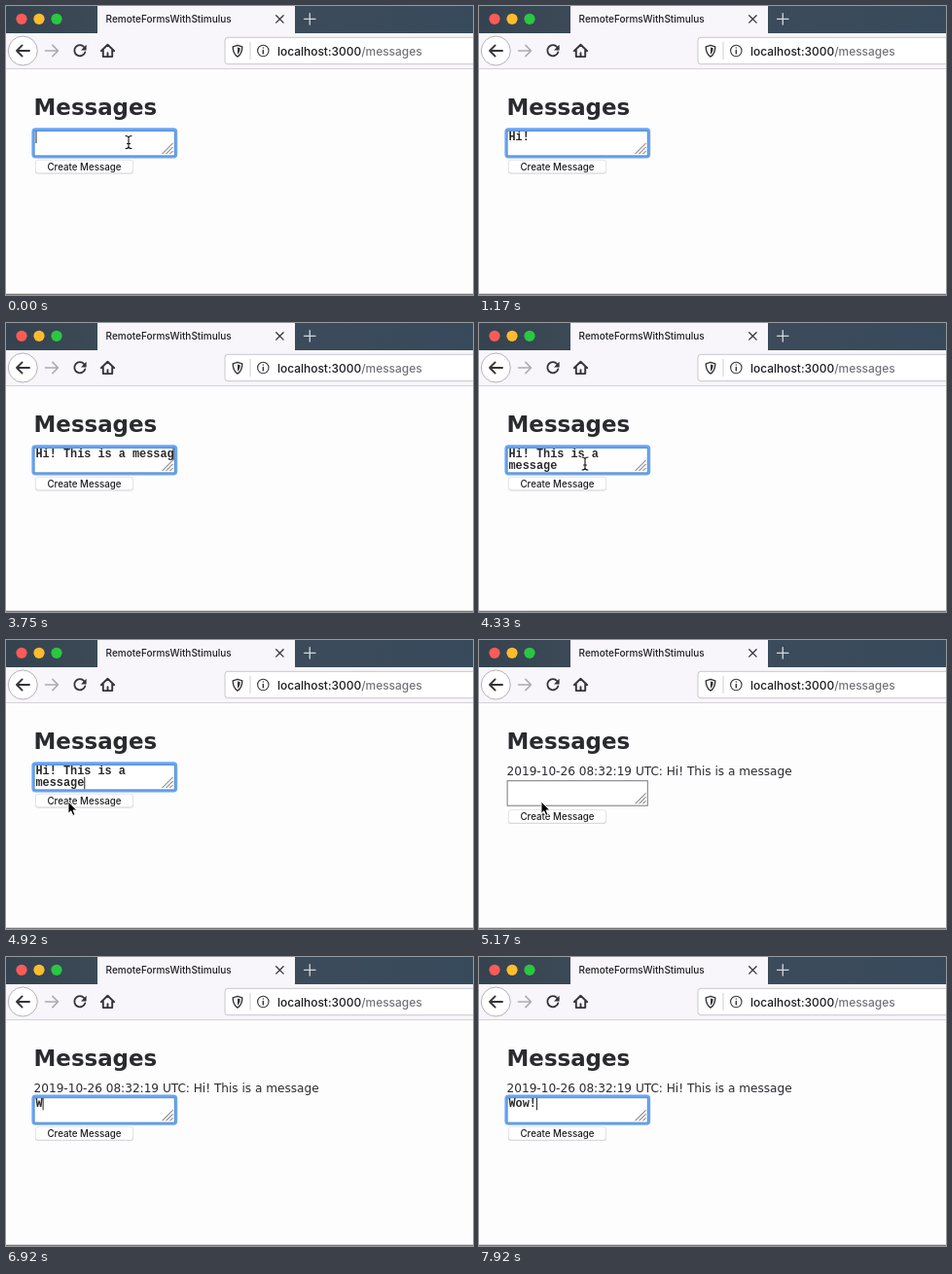
An HTML page for the animation above (8000 ms loop, 480x297 px).

```html
<!DOCTYPE html>
<html lang="en">
<head>
<meta charset="utf-8">
<title>Messages</title>
<style>
  html, body { margin: 0; width: 100%; height: 100%; overflow: hidden; background: #fff; }
  svg { display: block; width: 100vw; height: 100vh; }
  text { white-space: pre; }
  .ui { font-family: Inter, sans-serif; font-weight: 500; fill: #1c1c20; }
  .page { font-family: "DejaVu Sans", sans-serif; fill: #2a2b2f; }
  .mono { font: bold 11.85px "Liberation Mono", monospace; fill: #2a2a2a; }
  .icon { fill: none; stroke: #343438; stroke-width: 1.6; stroke-linecap: round; stroke-linejoin: round; }
</style>
</head>
<body>
<svg viewBox="0 0 480 297">
  <defs>
    <linearGradient id="bar">
      <stop offset="0" stop-color="#34434f"/>
      <stop offset=".2" stop-color="#3b4a56"/>
      <stop offset=".65" stop-color="#3c4b5b"/>
      <stop offset="1" stop-color="#374a5b"/>
    </linearGradient>
    <clipPath id="inner"><rect x="29.5" y="128.5" width="143.5" height="25"/></clipPath>
  </defs>

  <rect width="480" height="297" fill="#fefdfe"/>
  <rect width="480" height="28" fill="url(#bar)"/>
  <circle cx="16" cy="13.3" r="5.6" fill="#fc5b57"/>
  <circle cx="34" cy="13.3" r="5.6" fill="#fdbc2e"/>
  <circle cx="52" cy="13.3" r="5.6" fill="#2ac840"/>

  <rect y="28" width="480" height="36.5" fill="#f8f6fa"/>
  <rect x="94" width="203" height="29" fill="#f8f6fa"/>
  <text class="ui" x="102.6" y="17.4" font-size="10">RemoteFormsWithStimulus</text>
  <path class="icon" d="M277.7 9.7l7.4 7.4m0-7.4l-7.4 7.4" style="stroke-width:1.3"/>
  <path class="icon" d="M306.5 13.3h11.5m-5.75-5.75v11.5" style="stroke:#d3d8dc;stroke-width:1.3"/>
  <rect y="64" width="480" height="1" fill="#d3d1d5"/>

  <circle cx="17.3" cy="46" r="15" fill="#fff" stroke="#b5b3b8"/>
  <path class="icon" d="M24 46H11m5.6-5.6L11 46l5.6 5.6" style="stroke-width:1.9"/>
  <path class="icon" d="M40.5 46h13m-5.6-5.6l5.6 5.6l-5.6 5.6" style="stroke:#acabb0"/>
  <path class="icon" d="M80.3 42.2a5.6 5.6 0 1 0 1 5.2" style="stroke-width:1.8"/>
  <path d="M82.6 39.8v5.6h-5.6z" fill="#343438"/>
  <path class="icon" d="M97.8 46.2l6.7-6.4l6.7 6.4M99.8 45.5v6.6h9.4v-6.6M104.5 51.8v-3.5" style="stroke-width:1.9"/>

  <rect x="225" y="32.3" width="262" height="27.4" rx="3" fill="#fff" stroke="#c9c7cc"/>
  <path class="icon" d="M238 40.3l4.8 1.5c0 5-1.3 8.2-4.8 10.3c-3.5-2.1-4.8-5.3-4.8-10.3z" style="stroke-width:1.4"/>
  <path d="M238 42.5v7.2c1.8-1.5 2.6-3.5 2.7-6.4z" fill="#343438"/>
  <rect x="250.5" y="37" width="1" height="18" fill="#d0ced3"/>
  <circle class="icon" cx="264.3" cy="46" r="5.7" style="stroke-width:1.1"/>
  <path class="icon" d="M264.3 45.5v3.4M264.3 43v.1" style="stroke-width:1.4"/>
  <text class="ui" x="279" y="50.6" font-size="11.95">localhost:3000<tspan fill="#737278">/messages</tspan></text>

  <text class="page" x="28.6" y="111.9" font-size="22.9" font-weight="bold">Messages</text>
  <text id="posted" class="page" x="28.6" y="139.4" font-size="12.1">2019-10-26 08:32:19 UTC: Hi! This is a message</text>

  <g id="form">
    <rect id="ring" x="28" y="126.9" width="146.6" height="28" rx="2.5" fill="none" stroke="#68a6f4" stroke-width="3.2"/>
    <rect id="box" x="29.1" y="128.4" width="144.2" height="25.5" fill="#fff"/>
    <path d="M160.5 152l11-11m-7 11l7-7m-3 7l3-3" stroke="#5f5f5f" fill="none"/>
    <g clip-path="url(#inner)">
      <text id="line0" class="mono" x="30.5" y="137.8"></text>
      <text id="line1" class="mono" x="30.5" y="150.3"></text>
      <rect id="caret" width="1" height="12.5" fill="#222"/>
    </g>
    <rect x="30" y="158.6" width="101" height="14" rx="3" fill="#d2d0d3"/>
    <rect x="30.4" y="158.2" width="100.2" height="13.6" rx="3" fill="#fff" stroke="#e2e0e3" stroke-width=".8"/>
    <text class="ui" x="80.5" y="168.6" font-size="9.75" text-anchor="middle">Create Message</text>
  </g>

  <g id="beam" fill="none" stroke-linecap="round">
    <path d="M-3-6.5q3 0 3 2v9q0 2-3 2M3-6.5q-3 0-3 2v9q0 2 3 2M-1.5 1.5h3" stroke="#fff" stroke-width="2.4"/>
    <path d="M-3-6.5q3 0 3 2v9q0 2-3 2M3-6.5q-3 0-3 2v9q0 2 3 2M-1.5 1.5h3" stroke="#111" stroke-width="1.1"/>
  </g>
  <path id="arrow" d="M0 0v12.3l2.8-2.6l2 4.7l2.2-.9l-2-4.6h3.9z" fill="#000" stroke="#fff" stroke-width=".9"/>
  <rect y="295.7" width="480" height="1.3" fill="#77777a"/>
</svg>

<script>
const LOOP = 8000, TICK = 1000 / 12, CHAR = 7.11;
const SENT = 62, FOCUS = 76;
const FIRST = "Hi! This is a message", SECOND = "Wow!";

// [tick, typed characters, caret visible]
const typing = [
  [0, 0, 1], [1, 1, 1], [3, 2, 1], [7, 2, 0], [9, 3, 1], [13, 4, 1], [14, 4, 0],
  [17, 5, 1], [19, 6, 1], [20, 7, 1], [22, 8, 1], [23, 9, 1], [24, 10, 1], [26, 11, 1],
  [28, 12, 1], [29, 12, 0], [33, 13, 1], [35, 14, 1], [38, 15, 1], [39, 16, 1], [41, 17, 1],
  [43, 19, 1], [45, 20, 1], [47, 21, 1], [52, 21, 0], [57, 21, 1],
  [SENT, 0, 0], [FOCUS, 0, 1], [81, 1, 1], [86, 2, 1], [88, 3, 1], [90, 3, 0], [93, 4, 1]
];

// [tick, pointer shape, x, y]
const pointer = [
  [0, "beam", 126, 140], [1, "", 126, 140], [50, "beam", 126, 140], [54, "beam", 92, 149],
  [55, "arrow", 82, 158], [58, "arrow", 64, 166], [66, "arrow", 64, 166], [69, "arrow", 72, 194],
  [71, "arrow", 84, 222], [73, "arrow", 95, 208], [74, "beam", 96, 168], [75, "beam", 95, 164],
  [77, "", 95, 164]
];

const el = id => document.getElementById(id);
const show = (id, on) => el(id).setAttribute("visibility", on ? "visible" : "hidden");
const move = (id, x, y) => el(id).setAttribute("transform", `translate(${x} ${y})`);
const indexAt = (table, tick) => table.findLastIndex(row => row[0] <= tick);

function drawField(tick) {
  const [, count, caret] = typing[indexAt(typing, tick)];
  const text = (tick < SENT ? FIRST : SECOND).slice(0, count);
  const wrapped = text === FIRST;
  const lines = wrapped ? [text.slice(0, 14), text.slice(14)] : [text, ""];
  el("line0").textContent = lines[0];
  el("line1").textContent = lines[1];

  const last = lines[wrapped ? 1 : 0];
  el("caret").setAttribute("x", Math.min(30.5 + last.length * CHAR, 171.5));
  el("caret").setAttribute("y", wrapped ? 140.8 : 128.5);
  show("caret", caret);

  const focused = tick < SENT || tick >= FOCUS;
  show("ring", focused);
  el("box").setAttribute("stroke", focused ? "#5488c8" : "#777");
  show("posted", tick >= SENT);
  move("form", 0, tick < SENT ? 0 : 16.3);
}

function drawPointer(tick) {
  const i = indexAt(pointer, tick);
  const [start, shape, x, y] = pointer[i];
  const [end, , nextX, nextY] = pointer[i + 1] || [start + 1, "", x, y];
  const part = Math.min((tick - start) / (end - start), 1);
  for (const id of ["beam", "arrow"]) show(id, id === shape);
  if (shape) move(shape, x + (nextX - x) * part, y + (nextY - y) * part);
}

function frame(now) {
  const tick = Math.floor((now % LOOP + 4) / TICK) % 96;
  drawField(tick);
  drawPointer(tick);
  requestAnimationFrame(frame);
}
frame(performance.now());
</script>
</body>
</html>
```
